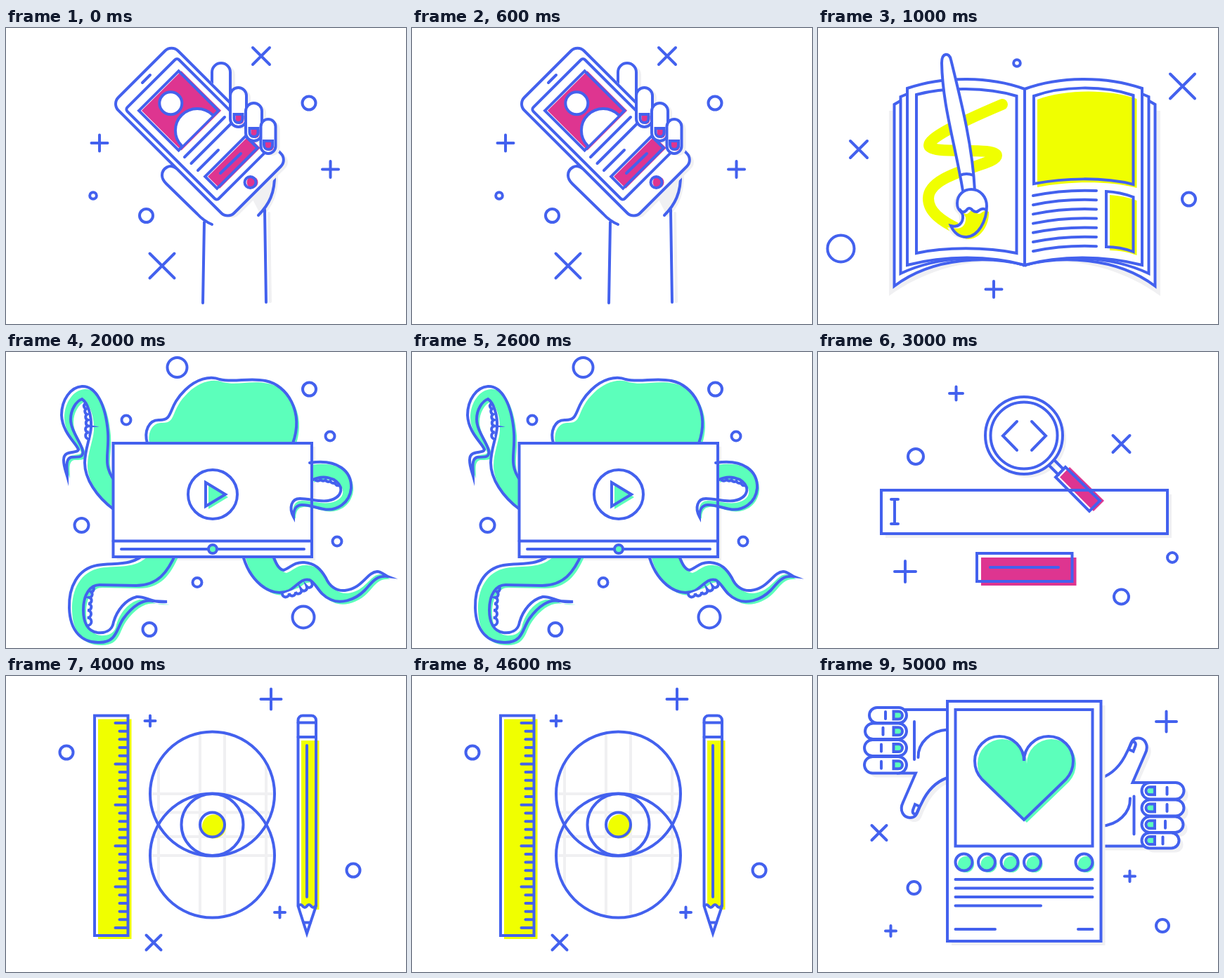
Recreate the animation shown at these times as an HTML page with a canvas. Size 569 px wide and 422 px high, loop 6 s.

```html
<!DOCTYPE html>
<html lang="en">
<head>
<meta charset="utf-8">
<title>Design icons</title>
<style>
html, body { margin: 0; width: 100%; height: 100%; overflow: hidden; background: #fff; }
canvas { display: block; width: 569px; height: 422px; }
</style>
</head>
<body>
<canvas id="stage"></canvas>
<script>
const W = 569, H = 422, SCENE_MS = 1000;
const BLUE = '#4361ee', PINK = '#de3590', YELLOW = '#f0ff00';
const GREEN = '#5cffbb', GREY = '#f0f0f2', WHITE = '#fff';

const canvas = document.getElementById('stage');
const ctx = canvas.getContext('2d');
const ratio = window.devicePixelRatio || 1;
canvas.width = W * ratio;
canvas.height = H * ratio;

// Path builders
const box = (x, y, w, h, r = 0) => r
  ? `M${x + r} ${y}h${w - 2 * r}a${r} ${r} 0 0 1 ${r} ${r}v${h - 2 * r}a${r} ${r} 0 0 1 ${-r} ${r}` +
    `h${2 * r - w}a${r} ${r} 0 0 1 ${-r} ${-r}v${2 * r - h}a${r} ${r} 0 0 1 ${r} ${-r}z`
  : `M${x} ${y}h${w}v${h}h${-w}z`;
const disc = (x, y, r) => `M${x + r} ${y}a${r} ${r} 0 1 1 ${-2 * r} 0a${r} ${r} 0 1 1 ${2 * r} 0z`;

// Row of small arcs along a quadratic curve
function scallops(x0, y0, cx, cy, x1, y1, n, sweep) {
  let d = `M${x0} ${y0}`;
  for (let i = 1; i <= n; i++) {
    const t = i / n, u = 1 - t;
    const x = u * u * x0 + 2 * u * t * cx + t * t * x1;
    const y = u * u * y0 + 2 * u * t * cy + t * t * y1;
    d += `A4.5 4.5 0 0 ${sweep} ${x} ${y}`;
  }
  return d;
}

// Painters
function ink(d, fill, color = BLUE) {
  const path = new Path2D(d);
  if (fill) {
    ctx.fillStyle = fill;
    ctx.fill(path);
  }
  ctx.strokeStyle = color;
  ctx.stroke(path);
}
function blot(d, color, dx = 0, dy = dx) {
  ctx.save();
  ctx.translate(dx, dy);
  ctx.fillStyle = color;
  ctx.fill(new Path2D(d));
  ctx.restore();
}
function offsetInk(d, color, dx, dy = dx) {
  blot(d, color, dx, dy);
  ink(d);
}
function turned(angle, x, y, paint) {
  ctx.save();
  ctx.translate(x, y);
  ctx.rotate(angle);
  paint();
  ctx.restore();
}
const ring = (x, y, r) => ink(disc(x, y, r));
const plus = (x, y, r) => ink(`M${x - r} ${y}h${2 * r}M${x} ${y - r}v${2 * r}`);
const times = (x, y, r) => ink(`M${x - r} ${y - r}l${2 * r} ${2 * r}M${x - r} ${y + r}l${2 * r} ${-2 * r}`);

function phone() {
  // wrist, palm and the finger behind the phone
  const index = 'M293 84V63a13 13 0 0 1 26 0V112z';
  blot(index, GREY, 7, 4);
  ink('M374 264L376 390', null, GREY);
  blot('M382 200C383 235 374 252 359 267L340 230z', GREY, 5, 3);
  ink('M282 277L280 392M368 259L370 391');
  ink('M382 207C383 235 374 252 359 267');
  ink('M293 84V63a13 13 0 0 1 26 0V112', WHITE);
  ink('M242 200C233 193 222 200 222 210C222 215 225 219 228 222L272 265Q281 275 293 280', WHITE);

  turned(-Math.PI / 4, 0, 0, () => {
    const body = box(30, 183, 120, 233, 13);
    blot(body, GREY, 2.1, 6.4);
    ink(body, WHITE);
    ink(box(38, 202, 104, 184, 4));
    offsetInk(box(50.3, 217, 80, 80), PINK, 2.8);
    offsetInk(box(50.5, 350, 81.5, 24), PINK, 2.8);
  });
  ink(disc(234.3, 107.3, 16), WHITE);
  ink('M250 168A31 31 0 0 1 294 124', WHITE);
  ink('M194 78L205 67M254 184L311 127M263.500 193L320 136.500M273 203L302 174M305 207L334 179');
  offsetInk(disc(347.5, 220, 8), PINK, 3, 0);

  const fingers = [[319, 85, 23, 56], [341, 107, 23, 54], [362.5, 130, 21, 49]];
  for (const [x, y, w, h] of fingers) {
    const shape = box(x, y, w, h, w / 2);
    const mid = x + w / 2, top = y + h - 18;
    const nail = `M${mid - 6} ${top}h12v6a6 6 0 0 1 -12 0z`;
    blot(shape, GREY, 6, 3);
    ink(shape, WHITE);
    blot(nail, PINK, 2, 2);
    ink(nail);
  }
  times(363, 40, 12);
  times(222, 339, 17.5);
  plus(133, 164, 11.5);
  plus(461.5, 201.5, 11.5);
  ring(431, 107, 9.5);
  ring(124, 239, 4.8);
  ring(199.5, 267.5, 9.5);
}

function book() {
  blot('M101 118H487V382C423 335 343 325 294 338C245 325 165 335 101 382z', GREY);
  const half = () => {
    ink('M-176.500 94L-185.500 109V368C-129 325 -49 325 0 338V100z', WHITE, WHITE);
    ink('M-177 104L-185.500 109V368C-129 325 -49 325 0 338');
    ink('M-167 94L-176.500 98V350C-119 323 -49 324 0 338', WHITE);
    ink('M0 87C-49 69 -114 68 -167 86V338C-114 324 -49 324 0 338z', WHITE);
  };
  for (const side of [1, -1]) {
    ctx.save();
    ctx.translate(294, 0);
    ctx.scale(side, 1);
    half();
    ctx.restore();
  }

  ink('M140 95C180 84 240 84 282.500 97V321C240 312 180 312 140 321z');
  ctx.lineWidth = 16;
  ink('M262 109Q158 153 158 167C158 182 254 168 254 182C254 196 157 205 157 243C157 262 175 275 200 287', null, YELLOW);
  ctx.lineWidth = 4;

  // brush
  const bulb = 'M189 282C200 285 207 278 206 267C205 260 198 262 198 250C198 238 207 230 218 230' +
    'C231 230 240 241 240 254C240 275 228 297 211 298C200 298 193 291 189 282z';
  const wave = 'q4 6 9 1q4 -6 9 0q5 4 9 0q5 -4 10 -1';
  blot(bulb, GREY, -5, 2);
  ink('M206 232C195 165 177 110 176 50C176 34 187 35 189 45C205 110 220 170 223 232', WHITE);
  ink('M202 210Q211 206 221 210');
  blot(bulb, WHITE);
  blot(`M202 259${wave}C240 277 228 297 211 298C200 298 193 291 189 282C200 285 207 278 206 267z`, YELLOW, 4, 3);
  ink(`M202 259${wave}`);
  ink(bulb);

  offsetInk('M307 97C345 83 405 81 448.500 96V223C405 212 350 214 307 222z', YELLOW, 5);
  for (let i = 0; i < 7; i++) {
    const y = 239 + i * 13.2;
    ink(`M306 ${y}Q350 ${y - 9} 396 ${y - 7}`);
  }
  offsetInk('M410 233Q430 234 448.500 241V319Q430 312 410 312z', YELLOW, 5);

  ring(283, 50, 4.8);
  ring(527.5, 244, 9.5);
  ring(32.5, 314.5, 19);
  times(518.5, 83, 17.5);
  times(58, 173, 12);
  plus(250, 372.5, 11.5);
}

function octopus() {
  const screen = box(152.5, 130, 282.5, 162);
  blot(screen, GREY, 5);
  offsetInk('M201 130C196 113 203 97 217 97C240 98 228 80 255 54C270 39 290 33 304 39' +
    'C325 44 345 36 369 41C400 47 424 85 408 130', GREEN, 4);
  offsetInk('M154 183C137 160 147 145 145 115C142 75 128 48 108 49C92 50 79 68 79 90' +
    'C80 115 100 130 103 139C102 146 82 138 82 154C82 163 85 170 87 177C87 165 84 152 93 150' +
    'C105 150 111 150 109 140C106 128 92 112 92 96C92 82 100 70 108 67C116 72 122 90 121 108' +
    'C120 122 112 140 112 158C112 180 128 206 154 225', GREEN, 4);
  ink(scallops(112, 74, 118, 95, 118, 124, 6, 0), WHITE);
  offsetInk('M199 286C180 306 155 300 130 304C102 309 89 335 90 365C91 398 108 415 133 414' +
    'C158 414 157 394 167 380C180 362 195 352 209 355L229 356C205 358 200 348 186 349' +
    'C170 353 158 368 153 385C151 398 140 401 130 400C116 398 110 385 110 368' +
    'C110 345 120 332 133 332L185 333C215 333 230 315 242 286', GREEN, 4);
  ink(scallops(124, 335, 114, 355, 116, 390, 6, 1), WHITE);
  offsetInk('M378 286C384 302 388 310 395 311C404 308 410 299 424 300C440 301 448 310 455 322' +
    'C460 334 470 341 482 340C508 337 513 314 528 313C534 313 538 318 543 320' +
    'C525 318 520 330 510 340C495 355 475 359 462 353C445 346 442 330 432 325' +
    'C420 322 415 333 403 340C375 352 345 325 336 286', GREEN, 4);
  ink(scallops(393, 345, 418, 344, 435, 329, 5, 0), WHITE);

  ink(screen, WHITE);
  ink('M152.500 269.500H435M164 281H424');
  ink(disc(294, 281, 6), GREEN);
  ring(294, 203, 35);
  offsetInk('M284 186L312 203L284 220z', GREEN, 4);

  offsetInk('M432 158C472 152 492 170 491 194C489 216 470 227 452 224C440 222 430 217 420 218' +
    'C411 219 409 226 409 235C402 222 406 209 418 209C432 209 445 214 458 212' +
    'C470 210 478 203 476 193C470 178 450 175 435 183', GREEN, 3);
  ink(scallops(440, 182, 459, 180, 474, 190, 5, 0), WHITE);
  ink('M435 130V292');

  const bubbles = [[243.5, 22, 14], [431.5, 53, 9.5], [171, 97, 6.5], [461, 120, 6.5], [107.5, 247, 10],
    [471, 270, 6.5], [272, 328.5, 6.5], [204, 395.5, 9.5], [423, 378, 15.5]];
  bubbles.forEach(b => ring(...b));
}

function search() {
  const field = box(90, 197, 407, 62);
  blot(field, GREY, 6);
  ink(field, WHITE);
  ink('M109 210V245M104 210H114M104 245H114');

  blot(disc(293, 119, 55), GREY, 5);
  ink(disc(293, 119, 55), WHITE);
  ring(293, 119, 47.5);
  ink('M283 99L263 119.500L283 140M304 99L324 119.500L304 140');
  ink('M329 162L342 175M337 155L349 167');
  const grip = 'M352 164L338 178.500L386 227L401 212z';
  blot(grip, PINK, 6, 0);
  ink('M356 197H405');
  ink(grip);

  offsetInk(box(226, 287, 135.5, 40), PINK, 6);
  ink('M245 307H342');

  plus(196.5, 59, 9.5);
  plus(124, 313, 15);
  times(431.5, 131, 12);
  ring(139, 149, 11);
  ring(504, 293, 7);
  ring(431.5, 349, 10.5);
}

function drafting() {
  offsetInk(box(126, 56.5, 47.5, 313.5), YELLOW, 5);
  for (let i = 0; i < 26; i++) {
    ink(`M${i % 5 ? 161.5 : 155.5} ${67 + i * 11.68}H173`);
  }

  const x = 293.5, r = 88.5;
  const upper = disc(x, 168, r), lower = disc(x, 256, r);
  ctx.save();
  ctx.clip(new Path2D(upper + lower));
  ink('M276 70V350M311 70V350M217 70V350M370 70V350M200 168H390M200 194.500H390M200 229H390M200 256H390', null, GREY);
  ctx.restore();
  ink(upper);
  ink(lower);
  ring(x, 212, 44);
  blot(disc(x, 212, 17), YELLOW, 2.5);
  ring(x, 212, 17.5);

  blot(box(415.5, 87, 25.5, 241), YELLOW, 4.5, 5);
  blot('M417 328L428 367L440 328z', WHITE);
  ink('M415.500 328V63a6.500 6.500 0 0 1 6.500 -6.500h12.500a6.500 6.500 0 0 1 6.500 6.500V328L428 367z');
  ink('M415.500 66.500H441M415.500 87H441M428 99V315M423.500 351.500H433');
  ink('M416 328q3 -4 6 0t6 0t6 0t6 0');

  ring(86, 109, 9.5);
  ring(494, 277, 9.5);
  plus(205, 64, 7.5);
  plus(377, 33, 14.5);
  plus(389.5, 337, 7.5);
  times(210, 380, 10.5);
}

// side is 1 for the left hand, -1 when the drawing is turned half way round
function thumbHand(side) {
  const palm = 'M184 48H114V138.500H139L121 180C115 192 122 202 131 202C142 202 141 192 147 182C157 160 170 150 184 145';
  const fingers = [[73, 45, 22], [67, 67.5, 22.5], [66, 91, 23], [66, 115, 23.5]];
  const marks = [96, 92.5, 90, 90];
  const shapes = fingers.map(([x, y, h]) => box(x, y, 126 - x, h, h / 2));
  [palm, ...shapes].forEach(d => blot(d, GREY, 6 * side));
  ink(palm, WHITE);
  fingers.forEach(([x, y, h], i) => {
    const mid = y + h / 2;
    const nail = `M107.500 ${mid - 5.5}h7a5.500 5.500 0 0 1 0 11h-7z`;
    ink(shapes[i], WHITE);
    blot(nail, GREEN, 1.5 * side);
    ink(nail);
    ink(`M${marks[i]} ${mid - 5}v10`);
  });
  ink('M137 65V119M184 76.500C160 78 142 95 142.500 116');
  ink('M138 183L144.500 186L140.500 195C138 199 133.500 196 135 191z');
}

function post() {
  thumbHand(1);
  turned(Math.PI, 586.5, 290.5, () => thumbHand(-1));

  const card = box(184, 36, 218.5, 342);
  blot(card, GREY, 6);
  ink(card, WHITE);
  ink(box(195.5, 48, 195, 194.5));
  offsetInk('M293 121A35 35 0 0 0 223 121Q223 136 233 147L293 205L353 147Q363 136 363 121A35 35 0 0 0 293 121z', GREEN, 4);
  for (const x of [207.5, 240, 272.5, 305, 378.5]) {
    blot(disc(x, 265.5, 11.5), GREEN, 3);
    ring(x, 265.5, 12);
  }
  ink('M195.500 290H390.500M195.500 302.500H390.500M195.500 315H390.500M195.500 327.500H317M195.500 361H252M370 361H390.500');

  times(87, 223.5, 10.5);
  plus(495.5, 65, 14.5);
  plus(443.5, 285.5, 7.5);
  plus(103.5, 363.5, 7.5);
  ring(136.5, 302, 9);
  ring(490, 356, 9);
}

const scenes = [phone, book, octopus, search, drafting, post];

function frame(now) {
  ctx.setTransform(ratio, 0, 0, ratio, 0, 0);
  ctx.fillStyle = WHITE;
  ctx.fillRect(0, 0, W, H);
  ctx.lineWidth = 4;
  ctx.lineCap = 'round';
  ctx.lineJoin = 'miter';
  scenes[Math.floor(now / SCENE_MS) % scenes.length]();
  requestAnimationFrame(frame);
}
frame(0);
</script>
</body>
</html>
```
